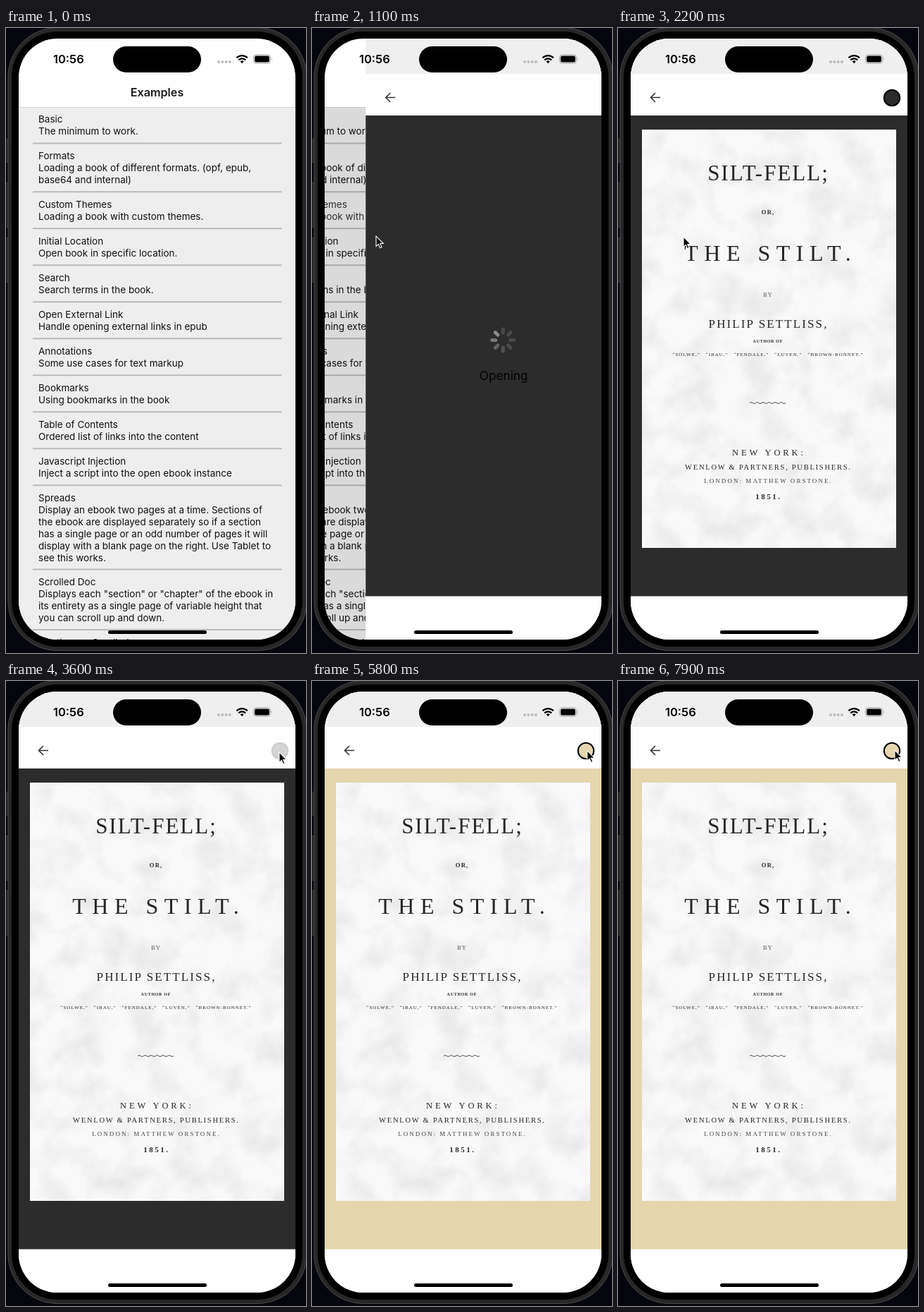
Write an HTML page that moves like this. It is 426 by 886 pixels and loops after 8000 ms.

```html
<!DOCTYPE html>
<html lang="en">
<head>
<meta charset="utf-8">
<title>Book reader themes</title>
<style>
  html, body { margin: 0; width: 100%; height: 100%; overflow: hidden; background: #05050d; }
  svg { display: block; }
  text { font-family: Inter, sans-serif; white-space: pre; }
  #print text { font-family: "Liberation Serif", serif; text-anchor: middle; fill: #262626; }
</style>
</head>
<body>
<svg width="426" height="886" viewBox="0 0 426 886">
  <defs>
    <clipPath id="screen"><rect x="18" y="15" width="393" height="852" rx="55"/></clipPath>
    <filter id="paper" x="0" y="0" width="1" height="1" color-interpolation-filters="sRGB">
      <feTurbulence type="fractalNoise" baseFrequency=".022" numOctaves="4" seed="5"/>
      <feColorMatrix values="0 0 0 0 .82  0 0 0 0 .82  0 0 0 0 .82  .9 0 0 0 -.36"/>
    </filter>
  </defs>

  <g fill="#222" stroke="#383838">
    <rect x="-3" y="157.500" width="6" height="33"/>
    <rect x="-3" y="219.500" width="6" height="63"/>
    <rect x="-3" y="297.500" width="6" height="63"/>
  </g>
  <rect x="3" y="-.5" width="424" height="883" rx="70" fill="#272727" stroke="#4a4a4a"/>
  <rect x="8" y="5" width="413" height="872" rx="65"/>

  <g clip-path="url(#screen)">
    <rect x="18" y="15" width="393" height="852" fill="#fff"/>
    <g id="list">
      <rect x="18" y="112" width="393" height="760" fill="#eee"/>
      <path d="M18 112.500H411" stroke="#d4d4d4"/>
      <text id="title" x="214.500" y="97" font-size="16.200" font-weight="600" text-anchor="middle" fill="#1c1c1e">Examples</text>
      <g id="items" font-size="13.500" fill="#111"></g>
    </g>
    <rect id="dim" x="18" y="112" width="393" height="760"/>

    <g id="reader">
      <rect x="18" y="15" width="393" height="852" fill="#fff"/>
      <rect x="18" y="15" width="393" height="50" fill="#efefef"/>
      <rect id="back" x="18" y="124" width="393" height="681.500"/>
      <path d="M60 98.500H47M53 92l-6.500 6.500 6.500 6.500" fill="none" stroke="#333" stroke-width="1.600"/>
      <circle id="toggle" cx="389" cy="99" r="11.200" stroke="#000" stroke-width="2"/>
      <g id="loading">
        <g id="spinner" transform="translate(213 442.500)" stroke="#fff" stroke-width="5" stroke-linecap="round"></g>
        <text x="214" y="499" font-size="17.200" text-anchor="middle">Opening</text>
      </g>
      <g id="cover">
        <rect x="34" y="144" width="361" height="593" fill="#f9f9f9"/>
        <rect x="34" y="144" width="361" height="593" filter="url(#paper)"/>
        <g id="print"></g>
        <path id="squiggle" fill="none" stroke="#444" stroke-width="1"/>
      </g>
    </g>

    <text x="67" y="50" font-size="16.500" font-weight="600">10:56</text>
    <g fill="#bbb">
      <circle cx="302" cy="48" r="2"/><circle cx="307.300" cy="48" r="2"/>
      <circle cx="312.600" cy="48" r="2"/><circle cx="317.900" cy="48" r="2"/>
    </g>
    <g fill="none" stroke="#000" stroke-width="2.300">
      <path d="M327.500 42.300a10.800 10.800 0 0 1 15.400 0M330.200 45.500a7 7 0 0 1 10 0"/>
      <path d="M332.600 47.300L335.200 50.300 337.800 47.300a4 4 0 0 0-5.200 0z" fill="#000" stroke="none"/>
    </g>
    <rect x="351.500" y="38" width="24" height="12" rx="3.800" fill="none" stroke="#999"/>
    <rect x="353" y="39.500" width="21" height="9" rx="2.500"/>
    <path d="M377 42q1.800 2 0 4z" fill="#999"/>
    <rect x="145" y="854" width="140" height="5" rx="2.500"/>
  </g>
  <rect x="152" y="26" width="125" height="37" rx="18.500"/>
  <path id="cursor" d="M0 0V14.500L3.300 11.400 5.600 16.800 8 15.800 5.700 10.500H10.300Z" stroke="#fff" stroke-width="1.100"/>
</svg>

<script>
const $ = id => document.getElementById(id);
const clamp = v => Math.max(0, Math.min(1, v));

function add(parent, tag, attrs, text = '') {
  const el = document.createElementNS('http://www.w3.org/2000/svg', tag);
  for (const name in attrs) el.setAttribute(name, attrs[name]);
  el.textContent = text;
  return parent.appendChild(el);
}

const examples = [
  'Basic|The minimum to work.',
  'Formats|Loading a book of different formats. (opf, epub,|base64 and internal)',
  'Custom Themes|Loading a book with custom themes.',
  'Initial Location|Open book in specific location.',
  'Search|Search terms in the book.',
  'Open External Link|Handle opening external links in epub',
  'Annotations|Some use cases for text markup',
  'Bookmarks|Using bookmarks in the book',
  'Table of Contents|Ordered list of links into the content',
  'Javascript Injection|Inject a script into the open ebook instance',
  'Spreads|Display an ebook two pages at a time. Sections of|the ebook are displayed separately so if a section|' +
    'has a single page or an odd number of pages it will|display with a blank page on the right. Use Tablet to|see this works.',
  'Scrolled Doc|Displays each "section" or "chapter" of the ebook in|its entirety as a single page of variable height that|' +
    'you can scroll up and down.',
  'Continuous Scrolled'
];
let top_ = 111.5;
const items = examples.map(example => {
  const lines = example.split('|'), item = add($('items'), 'g', {});
  lines.forEach((line, i) => add(item, 'text', { x: 46, y: top_ + 22.5 + i * 17 }, line));
  top_ += 18.4 + lines.length * 16.8;
  add($('items'), 'path', { d: `M38 ${top_}H391.500`, stroke: '#b9b9b9', 'stroke-width': 2 });
  return item;
});

// text, baseline, font size, letter spacing, extra attributes
[
  ['SILT-FELL;', 215.5, 31, 2, {}],
  ['OR,', 264, 8.5, 1.2, { 'font-weight': 700 }],
  ['THE STILT.', 330, 32, 8.5, {}],
  ['BY', 381, 8.5, 1.2, { opacity: .75 }],
  ['PHILIP SETTLISS,', 425, 17, 2.1, {}],
  ['AUTHOR OF', 445.5, 6, .7, { 'font-weight': 700 }],
  ['“SOLWE,” “IBAU,” “FENDALE,” “LUVEN,” “BROWN-BONNET.”', 465, 7, 1, { 'word-spacing': 5 }],
  ['NEW YORK:', 605.5, 12.5, 3.9, {}],
  ['WENLOW & PARTNERS, PUBLISHERS.', 625.5, 10.5, 1.75, {}],
  ['LONDON: MATTHEW ORSTONE.', 644.5, 9, 2.05, { opacity: .85 }],
  ['1851.', 667.5, 11, 2.5, { 'font-weight': 700 }]
].forEach(([text, y, size, spacing, extra]) =>
  add($('print'), 'text', { x: 212.5 + spacing / 2, y, 'font-size': size, 'letter-spacing': spacing, ...extra }, text));

$('squiggle').setAttribute('d', 'M187 531.500' + 'q2.125 -2 4.250 0t4.250 0'.repeat(6));

const spokes = Array.from({ length: 8 }, (_, i) =>
  add($('spinner'), 'path', { d: 'M0 -10.500V-15.500', transform: `rotate(${i * 45})` }));

const LOOP = 8000, PUSH = 850, LOADED = 2200;
const themes = ['#2c2c2c', '#fff', '#e5d6ae'];
const taps = [[3450, 3700], [4550, 4800], [5800, 6000], [7050, 7200], [7450, 7600]];
const cursorPath = [
  [150, -14, 400], [650, 90, 295], [1100, 91, 295], [1600, 93, 296], [2600, 93, 296],
  [3300, 388, 101], [3700, 388, 101], [4500, 390, 99], [5500, 390, 99], [6400, 393, 98], [LOOP, 393, 98]
];

// Opacity of a touchable: dims while held, recovers after release
const touch = (t, [press, release]) =>
  1 - .8 * clamp((t - press) / 150) * (1 - clamp((t - release) / 250));

function cursorAt(t) {
  const i = cursorPath.findIndex(point => point[0] > t);
  if (i < 1) return cursorPath[0].slice(1);
  const [t0, x0, y0] = cursorPath[i - 1], [t1, x1, y1] = cursorPath[i];
  const u = (t - t0) / (t1 - t0), k = u * u * (3 - 2 * u);
  return [x0 + (x1 - x0) * k, y0 + (y1 - y0) * k];
}

function draw(t) {
  const s = 13.5 * Math.max(0, t - PUSH) / 1000;
  const spring = (1 + s) * Math.exp(-s);
  const left = spring < .002 ? 0 : spring;
  $('reader').setAttribute('transform', `translate(${393 * left} 0)`);
  $('list').setAttribute('transform', `translate(${-118 * (1 - left)} 0)`);
  $('title').setAttribute('opacity', clamp(left * 2 - 1));
  $('dim').setAttribute('opacity', .1 * (1 - left));
  items[2].setAttribute('opacity', touch(t, [700, 900]));

  const theme = themes[taps.filter(tap => t >= tap[1]).length % 3];
  $('back').setAttribute('fill', theme);
  $('toggle').setAttribute('fill', theme);
  $('toggle').setAttribute('opacity', Math.min(...taps.map(tap => touch(t, tap))));

  $('loading').style.display = t < LOADED ? '' : 'none';
  $('cover').style.display = t < LOADED ? 'none' : '';
  const head = Math.floor(t / 100) + 4;
  spokes.forEach((spoke, i) =>
    spoke.setAttribute('opacity', Math.max(.13, .45 - .09 * ((head - i + 8) % 8))));

  $('cursor').setAttribute('transform', `translate(${cursorAt(t)})`);
}

function tick() {
  draw(performance.now() % LOOP);
  requestAnimationFrame(tick);
}
tick();
</script>
</body>
</html>
```
